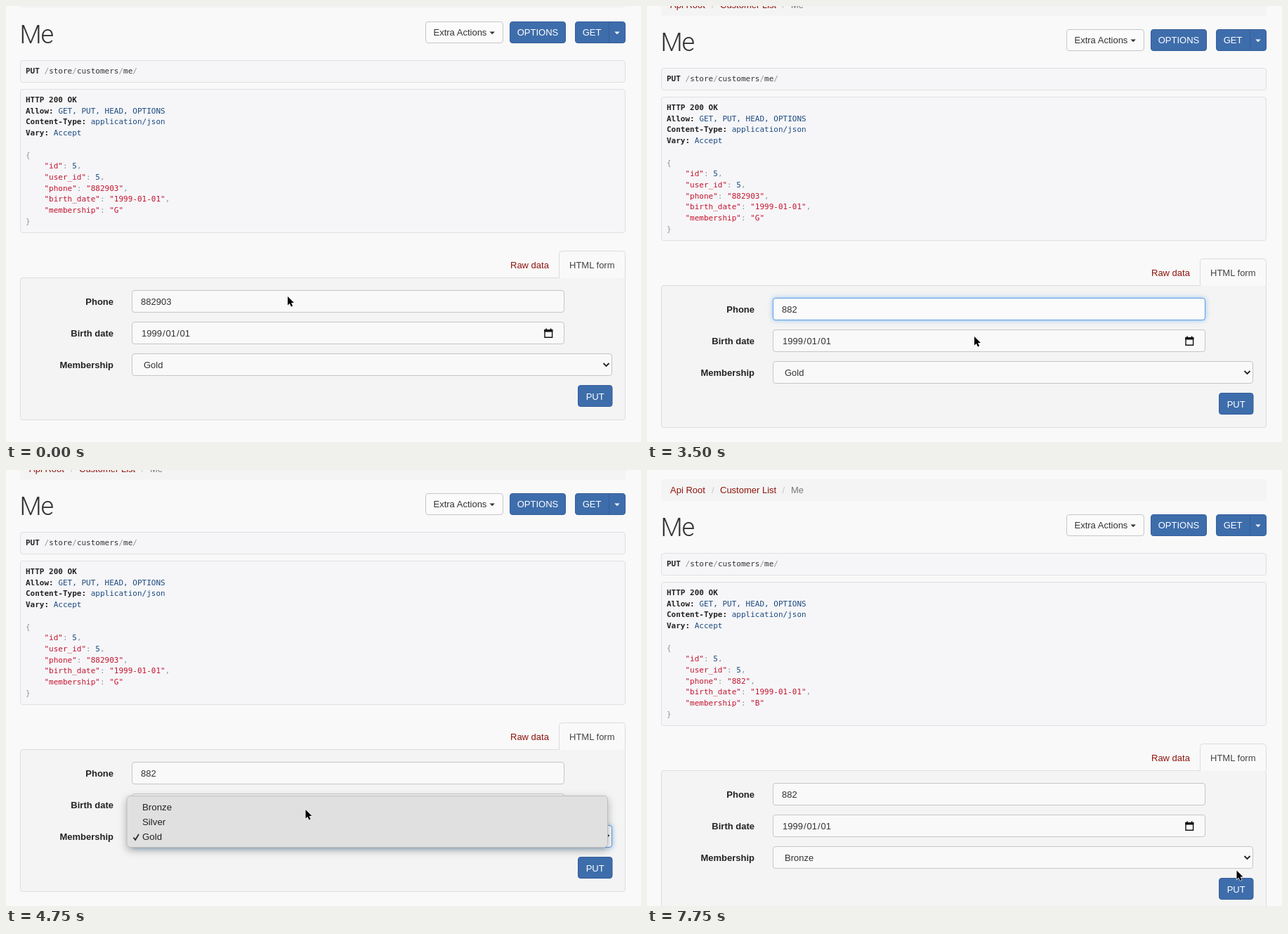
These frames come from a looping animation (904 px wide and 620 px high, 8.75 s). An HTML page:

```html
<!DOCTYPE html>
<html lang="en">
<head>
<meta charset="utf-8">
<title>Customer form</title>
<style>
html, body { margin: 0; width: 100%; height: 100%; overflow: hidden; background: #f9f9f9; }
svg { display: block; width: 904px; height: 620px; }
text { font: 13px "Liberation Sans", Arial, sans-serif; fill: #333; white-space: pre; }
.mono { font: 11px "DejaVu Sans Mono", monospace; }
.bold { font-weight: bold; fill: #222; }
.title { font: 300 36px Roboto, sans-serif; letter-spacing: -1.2px; }
.link { fill: #8e150d; }
.menu { font-size: 13.3px; fill: #222; }
.light { fill: #fff; }
.k { fill: #c4142f; }
.n { fill: #1d4b80; }
.p { fill: #8f9799; }
.b { font-weight: bold; fill: #222; }
.focus { filter: drop-shadow(0 0 3.5px rgba(90, 165, 235, .65)); }
.shadow { filter: drop-shadow(0 4px 6px rgba(0, 0, 0, .28)); }
</style>
</head>
<body>
<svg id="stage" viewBox="0 0 904 620"></svg>
<script>
const stage = document.getElementById('stage');
const LOOP = 8750, STEP = 250;
const BLUE = '#3e6dab', DARK_BLUE = '#2d5186', PAGE = '#f9f9f9';
const OLD_PHONE = '882903', NEW_PHONE = '882';
const LEVELS = ['Bronze', 'Silver', 'Gold'];

const start = {
  scroll: 0, phone: OLD_PHONE, level: 'Gold', saved: [OLD_PHONE, 'G'], focus: '', glow: 0,
  caret: false, selected: false, menu: false, hot: -1, put: '', mouse: [401, 413]
};

// Each entry changes part of the state from its time on.
const changes = [
  [250, { focus: 'phone', glow: .5, caret: true, mouse: [399, 416] }],
  [500, { glow: 1, mouse: [397.5, 418] }],
  [750, { selected: true, caret: false }],
  [1250, { selected: false, phone: '', caret: true, mouse: null }],
  [1500, { caret: false }],
  [1750, { phone: NEW_PHONE.slice(0, 1), caret: true }],
  [2000, { phone: NEW_PHONE.slice(0, 2) }],
  [2500, { caret: false }],
  [2750, { phone: NEW_PHONE, caret: true }],
  [3000, { caret: false }],
  [3500, { scroll: 11, mouse: [466, 470] }],
  [3750, { mouse: [438, 508] }],
  [4000, { focus: 'level', menu: true, hot: 2, mouse: [428, 516] }],
  [4250, { hot: 1, mouse: [427.5, 508.5] }],
  [4500, { hot: 0, mouse: [426.5, 483] }],
  [4750, { hot: -1 }],
  [5000, { menu: false, level: 'Bronze' }],
  [5250, { mouse: [520, 503] }],
  [5500, { mouse: [700, 543] }],
  [5750, { mouse: [822, 567] }],
  [6000, { put: 'hover', mouse: [839.5, 569.5] }],
  [6250, { put: 'pressed', focus: '' }],
  [6500, { scroll: 41, put: '', saved: [NEW_PHONE, 'B'] }],
  [7500, { scroll: 45 }],
  [7750, { scroll: 41 }]
];

const stateAt = time =>
  Object.assign({}, start, ...changes.filter(([at]) => at <= time).map(([, part]) => part));

const text = (x, y, content, cls = '', extra = '') =>
  `<text x="${x}" y="${y}" class="${cls}" ${extra}>${content}</text>`;
const rect = (x, y, w, h, fill, stroke = 'none', r = 3.5, extra = '') =>
  `<rect x="${x}" y="${y}" width="${w}" height="${h}" rx="${r}" fill="${fill}" stroke="${stroke}" ${extra}/>`;
const path = (d, extra) => `<path d="${d}" ${extra}/>`;
const span = (cls, content) => `<tspan class="${cls}">${content}</tspan>`;
const centered = (x, y, content, cls) => text(x, y, content, cls, 'text-anchor="middle"');
const caretDown = (x, y, fill) => path(`M${x} ${y}h7.4l-3.7 3.8z`, `fill="${fill}"`);
const blueButton = (x, y, w, fill = BLUE) => rect(x + .5, y + .5, w - 1, 30, fill, '#345f9b');

function header() {
  return rect(20, -28, 862, 31, '#f4f4f4') +
    text(33, -8, 'Api Root', 'link') + text(92, -8, '/', '', 'style="fill:#c4c4c4"') +
    text(104, -8, 'Customer List', 'link') + text(192.5, -8, '/', '', 'style="fill:#c4c4c4"') +
    text(205, -8, 'Me', '', 'style="fill:#777"') +
    text(19.5, 53, 'Me', 'title') +
    rect(597.5, 22.5, 109.9, 30, '#fbfbfb', '#c6c6c6') +
    text(608.5, 42, 'Extra Actions') + caretDown(688.5, 36.5, '#333') +
    blueButton(717, 22, 80) + centered(757, 42, 'OPTIONS', 'light') +
    blueButton(810, 22, 72) + path('M858.5 23v29', 'stroke="#345f9b"') +
    centered(834, 42, 'GET', 'light') + caretDown(866.3, 36.5, '#fff');
}

function response([phone, level]) {
  const head = (name, value) => span('b', name + ':') + ' ' + span('n', value);
  const field = (name, value, cls, end = ',') =>
    '    ' + span('k', `"${name}"`) + span('p', ': ') + span(cls, value) + span('p', end);
  const slash = span('p', '/');
  const lines = [
    span('b', 'HTTP 200 OK'),
    head('Allow', 'GET, PUT, HEAD, OPTIONS'),
    head('Content-Type', 'application/json'),
    head('Vary', 'Accept'),
    '',
    span('p', '{'),
    field('id', 5, 'n'),
    field('user_id', 5, 'n'),
    field('phone', `"${phone}"`, 'k'),
    field('birth_date', '"1999-01-01"', 'k'),
    field('membership', `"${level}"`, 'k', ''),
    span('p', '}')
  ];
  const request = span('b', 'PUT') + ' ' + slash + ['store', 'customers', 'me'].join(slash) + slash;
  return rect(20.5, 77.5, 861, 31, '#f6f6f8', '#e0e0e5') + text(28, 96, request, 'mono') +
    rect(20.5, 118.5, 861, 204, '#f6f6f8', '#e0e0e5') +
    lines.map((line, i) => text(28, 137 + i * 15.7, line, 'mono')).join('');
}

function input(y, w, glow) {
  const box = rect(179.5, y, w, 31, PAGE, '#c6c6c6');
  if (!glow) return box;
  return box + rect(179.5, y, w, 31, '#fbfbfb', '#5d9fe6', 3.5, `class="focus" opacity="${glow}"`);
}

function phoneField(s) {
  const width = s.phone.length * 7.23;
  return input(404.5, 615, s.focus === 'phone' && s.glow) +
    (s.selected ? rect(192, 413, width, 15, '#b4d5fb', 'none', 0) : '') +
    text(192, 424.5, s.phone) +
    (s.caret ? rect(192 + width - .5, 413, 1, 14, '#222', 'none', 0) : '');
}

function dateField() {
  const parts = [[193, '1999'], [222.9, '/'], [227.5, '01'], [243, '/'], [247.6, '01']];
  return input(449.5, 615) + parts.map(([x, part]) => text(x, 469.5, part)).join('') +
    path('M767 460.8h10.6v10.4h-10.6z', 'fill="none" stroke="#111" stroke-width="1.4"') +
    path('M766.3 460h12v3.6h-12zM768.2 458.5h1.6v2h-1.6zM774.8 458.5h1.6v2h-1.6z', 'fill="#111"');
}

function form(s) {
  const label = (y, name) => text(153, y, name, 'bold', 'text-anchor="end"');
  const pressed = s.put === 'pressed';
  return rect(20.5, 386.5, 861, 202, '#f4f4f4', '#dedee0') +
    path('M787.5 387V352.5q0-4 4-4H877.5q4 0 4 4V387', `fill="${PAGE}" stroke="#dcdcdc"`) +
    text(718, 372.5, 'Raw data', 'link') + text(802, 372.5, 'HTML form', '', 'style="fill:#444"') +
    label(424.5, 'Phone') + label(469.5, 'Birth date') + label(514.5, 'Membership') +
    phoneField(s) + dateField() +
    input(494.5, 683, s.focus === 'level' && s.glow) + text(196, 514.5, s.level) +
    path('M850.5 508l4 4 4-4', 'fill="none" stroke="#222" stroke-width="1.8"') +
    (pressed ? rect(813.5, 538.5, 50.5, 32, 'none', '#3b78d8', 4.5, 'stroke-width="1.5"') +
      rect(815, 540, 47.5, 29, DARK_BLUE, '#fff', 3)
      : blueButton(814, 539, 49.5, s.put ? DARK_BLUE : BLUE)) +
    centered(838.7, 559.5, 'PUT', 'light');
}

function menu(hot) {
  const rows = LEVELS.map((name, i) =>
    (i === hot ? rect(177, 490 + (i - 1) * 21, 675, 21, '#5c92f8', 'none', 4) : '') +
    text(194, 484 + i * 21.1, name, i === hot ? 'menu light' : 'menu'));
  return rect(172, 463.5, 684.5, 73, '#e0e0e0', '#bdbdbd', 5, 'class="shadow"') + rows.join('') +
    path('M181.5 522.5l2.6 3.5 4.9-8', `fill="none" stroke="${hot === 2 ? '#fff' : '#222'}" stroke-width="1.7"`);
}

const pointer = ([x, y]) =>
  path('M0 0V12.6L2.9 9.9 4.9 14.4 7.1 13.4 5.1 9.1H9z',
    `transform="translate(${x} ${y})" fill="#000" stroke="#fff" stroke-width="1.2" paint-order="stroke"`);

function draw(time) {
  const s = stateAt(time);
  stage.innerHTML = rect(0, 0, 904, 620, PAGE, 'none', 0) +
    `<g transform="translate(0 ${s.scroll})">${header()}${response(s.saved)}${form(s)}</g>` +
    (s.menu ? menu(s.hot) : '') + (s.mouse ? pointer(s.mouse) : '');
}

const began = performance.now();
let shown = -1;
function tick() {
  const time = Math.max(0, performance.now() - began) % LOOP;
  const step = Math.floor(time / STEP);
  if (step !== shown) draw((shown = step) * STEP);
  requestAnimationFrame(tick);
}
tick();
</script>
</body>
</html>
```
